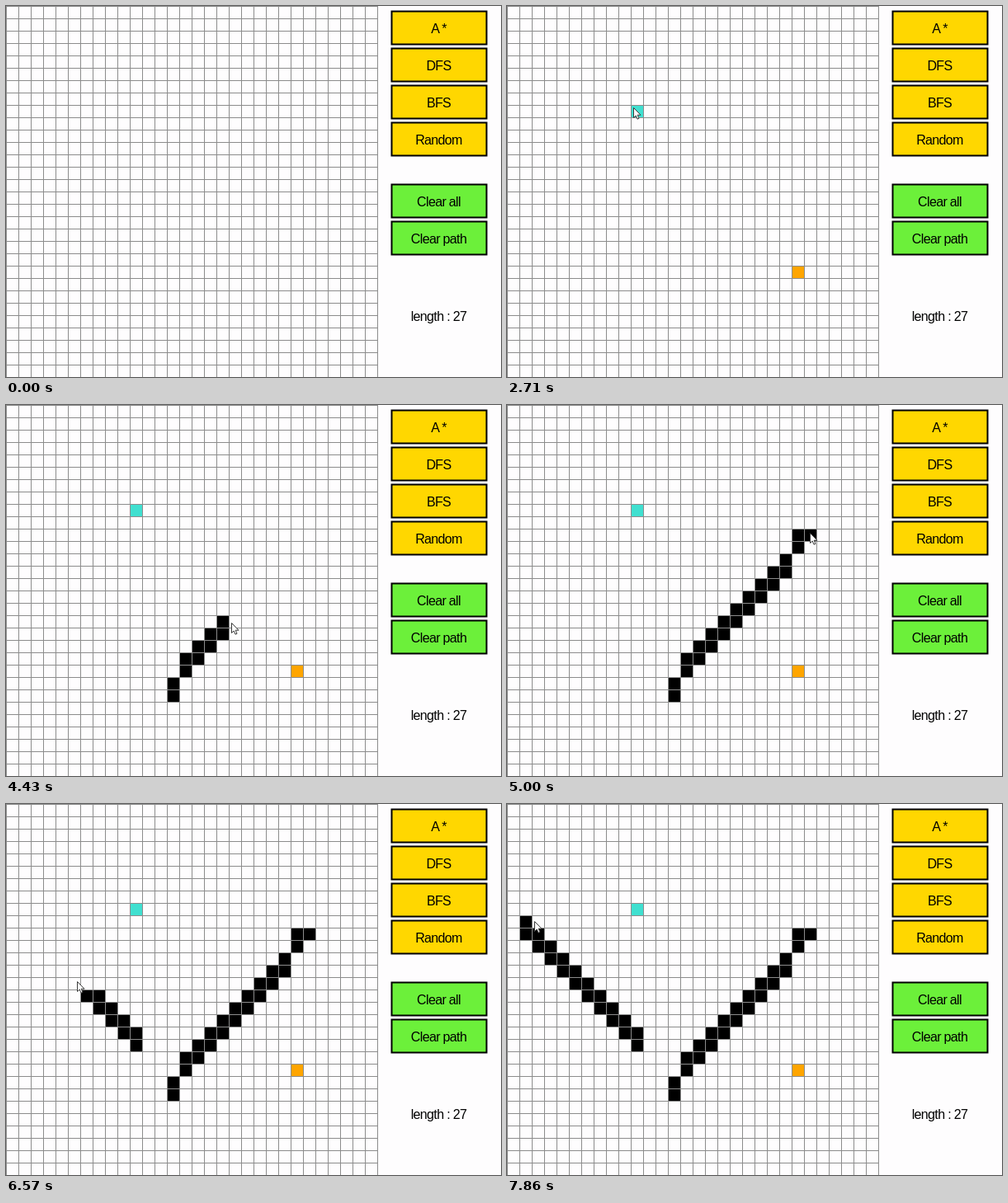
An HTML page for the animation above (8000 ms loop, 600 px wide and 450 px high).

```html
<!DOCTYPE html>
<html lang="en">
<head>
<meta charset="utf-8">
<title>Path finder</title>
<style>
  html, body { margin: 0; width: 100%; height: 100%; overflow: hidden; background: #fefdfe; }
  svg { display: block; width: 600px; height: 450px; }
  text { font: 16px "Liberation Sans", Arial, sans-serif; letter-spacing: -0.65px; text-anchor: middle; }
  .grid { fill: none; stroke: #8c8c8c; shape-rendering: crispEdges; }
  .cell { shape-rendering: crispEdges; }
  .button { stroke: #000; stroke-width: 2; }
  .cursor { fill: #fff; stroke: #3a3a3a; stroke-linejoin: round; }
</style>
</head>
<body>
<svg id="stage" viewBox="0 0 600 450"></svg>
<script>
const LOOP = 8000, FPS = 7, CELL = 15, SIZE = 30;
const stage = document.getElementById('stage');

function add(tag, attrs, content = '') {
  const el = document.createElementNS('http://www.w3.org/2000/svg', tag);
  for (const key in attrs) el.setAttribute(key, attrs[key]);
  el.textContent = content;
  return stage.appendChild(el);
}

const addCell = ([col, row], fill) => add('rect', {
  class: 'cell', x: col * CELL, y: row * CELL, width: CELL, height: CELL, fill
});

// Two cells per column, climbing one row with each column
function stairs(col, row, dir, columns) {
  const cells = [];
  for (let i = 0; i < columns; i++) {
    cells.push([col + dir * i, row - i], [col + dir * i, row - i - 1]);
  }
  return cells;
}

// Paints its cells one after another over a number of ticks
function addStroke(cells, start, ticks = 1, power = 1, fill = '#000') {
  return { rects: cells.map(cell => addCell(cell, fill)), start, ticks, power };
}

function addButton(y, label, fill) {
  add('rect', { class: 'button', x: 467.5, y: y + 0.5, width: 115, height: 40, fill });
  add('text', { x: 524.5, y: y + 27 }, label);
}

const rightWall = [[13, 23], [13, 22], ...stairs(14, 21, 1, 9), [23, 11], [23, 10], [24, 10]];
const leftWall = stairs(10, 19, -1, 10);
const lastCell = leftWall.pop();

const strokes = [
  addStroke([[23, 21]], 12, 1, 1, '#ffa500'),
  addStroke([[10, 8]], 19, 1, 1, '#40e0d0'),
  addStroke(rightWall, 26, 10, 1.6),
  addStroke(leftWall, 43, 7, 1.33),
  addStroke([lastCell], 51)
];

// Pointer key points: tick, x, y
const path = [
  [6, 334, 216], [8, 352, 326], [12, 352, 326], [17, 153, 123], [19, 153, 123],
  [22, 238, 290], [25, 198, 346], [26, 198, 346], [31, 273, 264], [35, 367, 155],
  [40, 255, 272], [42, 176, 292], [43, 157, 294], [46, 86, 215], [49, 20, 151],
  [50, 20, 151], [55, 33, 142]
];

let lines = 'M450.5 0V450';
for (let i = 0; i < SIZE; i++) {
  const p = i * CELL + 0.5;
  lines += `M${p} 0V450M0 ${p}H450`;
}
add('path', { class: 'grid', d: lines });

['A *', 'DFS', 'BFS', 'Random'].forEach((label, i) => addButton(6 + 45 * i, label, '#ffd700'));
['Clear all', 'Clear path'].forEach((label, i) => addButton(216 + 45 * i, label, '#6cf03a'));
add('text', { x: 524.5, y: 382 }, 'length : 27');

const cursor = add('path', {
  class: 'cursor',
  d: 'M.5 .5V12.5L3.2 10L5 14.2L7 13.3L5.2 9.2H9Z'
});

// Ticks fall on whole hundredths of a second
function tickAt(t) {
  let tick = 0;
  while (Math.round((tick + 1) * 100 / FPS) * 10 <= t) tick++;
  return tick;
}

function tipAt(tick) {
  const next = path.findIndex(key => key[0] > tick);
  if (next === 0) return null;
  if (next < 0) return path[path.length - 1].slice(1);
  const [t0, x0, y0] = path[next - 1], [t1, x1, y1] = path[next];
  const p = (tick - t0) / (t1 - t0);
  return [x0 + (x1 - x0) * p, y0 + (y1 - y0) * p].map(Math.round);
}

function render(t) {
  const tick = tickAt(t);
  for (const { rects, start, ticks, power } of strokes) {
    const p = Math.min(1, Math.max(0, (tick - start + 1) / ticks));
    const count = Math.round(rects.length * p ** power);
    rects.forEach((rect, i) => { rect.style.display = i < count ? '' : 'none'; });
  }
  const tip = tipAt(tick);
  cursor.style.display = tip ? '' : 'none';
  if (tip) cursor.setAttribute('transform', `translate(${tip})`);
}

const begin = performance.now();
function loop() {
  render((performance.now() - begin) % LOOP);
  requestAnimationFrame(loop);
}
loop();
</script>
</body>
</html>
```
